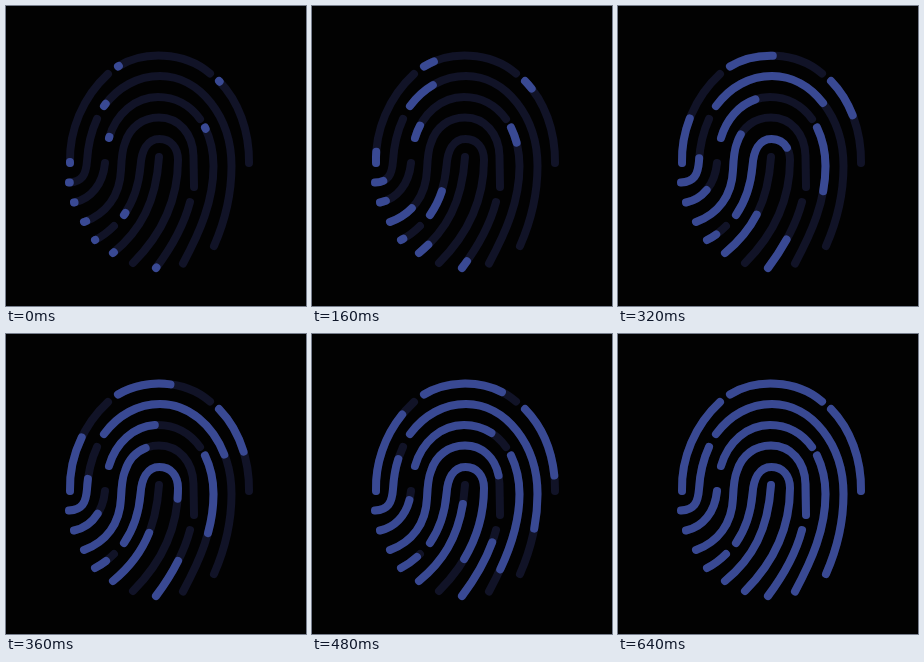
Write an HTML page that moves like this. It is 300 px wide and 300 px high and loops after 1.04 s.

```html
<!DOCTYPE html>
<html lang="en">
<head>
<meta charset="utf-8">
<title>Fingerprint scan</title>
<style>
  html, body { margin: 0; width: 100%; height: 100%; overflow: hidden; background: #020202; }
  svg { display: block; width: 100%; height: 100%; }
  path { fill: none; stroke-width: 8; stroke-linecap: round; stroke-linejoin: round; }
  #track path { stroke: #111327; }
  #fill path { stroke: #394993; }
</style>
</head>
<body>
<svg viewBox="0 0 300 300">
  <g id="track"></g>
  <g id="fill"></g>
</svg>
<script>
const LOOP = 1040, STEP = 40, START = 40, GROW = 600, MIN = 0.01;

// Each ridge is drawn from the end where its growth begins.
const ridges = [
  'M112 60.5C137 45 178 45 204 67.5',
  'M213 75C232.5 95 243.5 125 243 157',
  'M64 157C63 124 77 91 102 68',
  'M98 100C112 81 132 70 154 70C194 70 225.5 111 225.5 160C225.5 188 219 215 208 240',
  'M103 132C110 108 129 91 152 91C169 91 184 99 194 113',
  'M199 121.5C205 134 207.5 146 207.5 160C207.5 195 194 226 177 257.5',
  'M78 216C100 208 114 190 115 164C115.5 152 116 144 119 137C124 121 137 111.5 153 111.5C173 111.5 187 128 187.5 150L188 181',
  'M118 209C129 193 133 178 134.5 160C135.5 145 141 133 153.5 133C165 133 172 142 172 154C172 194 155 229 127 257',
  'M107 247C135 224 150 196 153 151',
  'M150 262C165 242 178 219 184 196',
  'M89 234Q99 229 108 220',
  'M68 196.5C85 193 97 178 99 157',
  'M63 176.5C76 176 80 169 81 155C82 138 85 126 91 113'
];

function addPath(groupId, d) {
  const path = document.createElementNS('http://www.w3.org/2000/svg', 'path');
  path.setAttribute('d', d);
  document.getElementById(groupId).appendChild(path);
  return path;
}

const strokes = ridges.map(d => {
  addPath('track', d);
  const path = addPath('fill', d);
  return { path, length: path.getTotalLength() };
});

const smooth = u => u * u * (3 - 2 * u);

function render(ms) {
  const t = Math.floor((ms % LOOP) / STEP) * STEP;
  const u = Math.min(1, Math.max(0, (t - START) / GROW));
  const part = MIN + (1 - MIN) * smooth(u);
  for (const { path, length } of strokes) {
    path.setAttribute('stroke-dasharray',
      part < 1 ? `${length * part} ${length * 2}` : 'none');
  }
}

const origin = performance.now();
function tick() {
  render(performance.now() - origin);
  requestAnimationFrame(tick);
}
tick();
</script>
</body>
</html>
```
